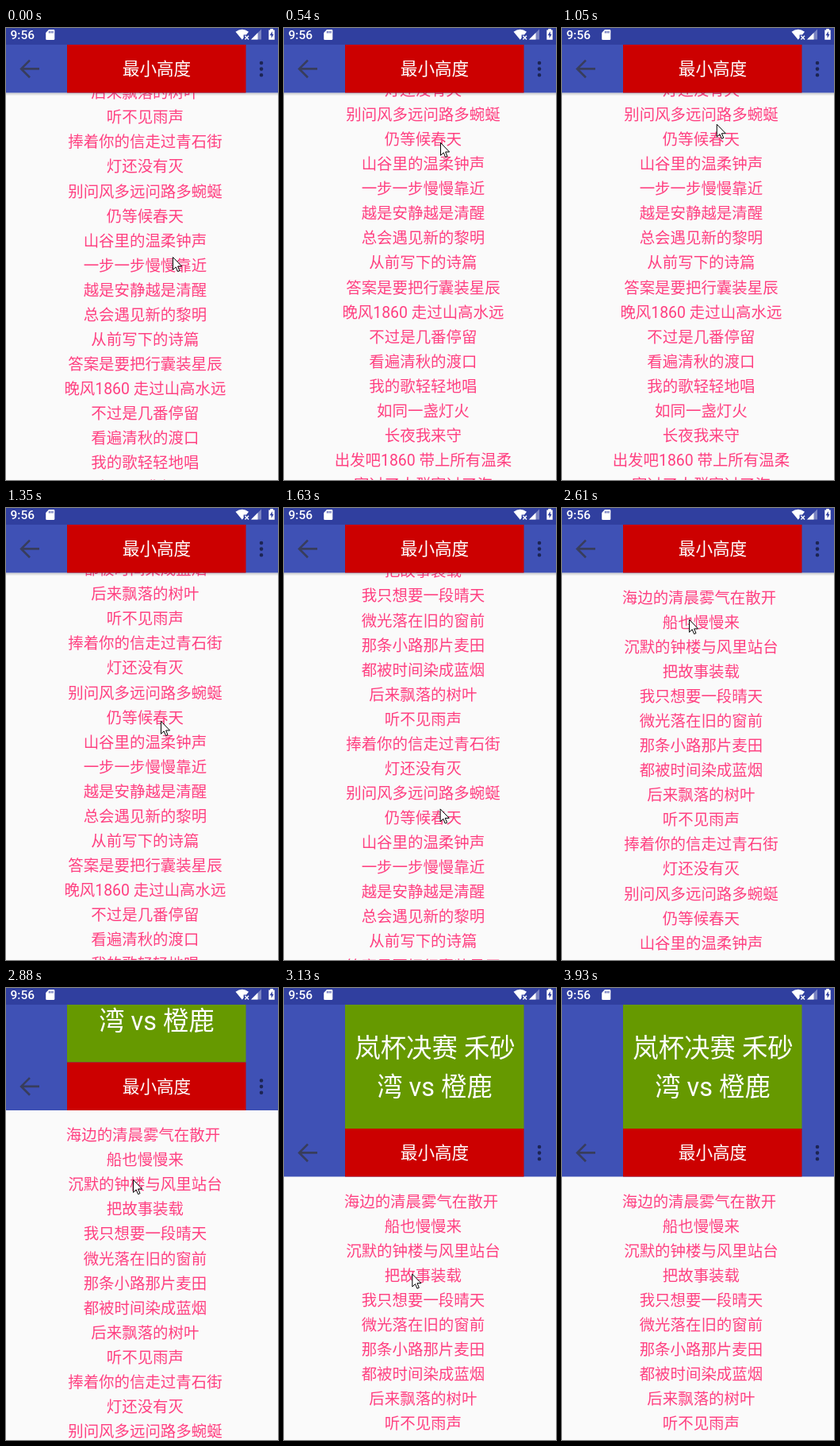
An HTML page for the animation above (5010 ms loop, 343x569 px).

```html
<!DOCTYPE html>
<html lang="zh-CN">
<head>
<meta charset="utf-8">
<title>最小高度</title>
<style>
  html, body { margin: 0; width: 100%; height: 100%; overflow: hidden; background: #fafafa; }
  svg { display: block; width: 100vw; height: 100vh; }
  text { font-family: Roboto, "Noto Sans CJK SC", "Noto Sans CJK", sans-serif; text-anchor: middle; }
  #lines { font-size: 19.45px; fill: #ff4081; }
  .title { font-size: 21.6px; fill: #fff; }
  .match { font-size: 32.4px; fill: #fff; }
  .clock { font-size: 15.5px; font-weight: 500; fill: #fff; text-anchor: start; }
</style>
</head>
<body>
<svg viewBox="0 0 343 569">
  <defs>
    <linearGradient id="fade" x2="0" y2="1">
      <stop stop-color="#000" stop-opacity=".2"/>
      <stop offset="1" stop-color="#000" stop-opacity="0"/>
    </linearGradient>
  </defs>
  <rect width="343" height="569" fill="#fafafa"/>
  <g id="lines"></g>

  <!-- app bar, drawn collapsed; the green part hides above -->
  <g id="bar">
    <rect id="shadow" y="81.5" width="343" height="4" fill="url(#fade)"/>
    <rect y="-135" width="343" height="216.5" fill="#3f51b5"/>
    <rect x="77" y="-135" width="225.5" height="156" fill="#690"/>
    <text class="match" x="190.5" y="-69">岚杯决赛 禾砂</text>
    <text class="match" x="190" y="-20">湾 vs 橙鹿</text>
    <rect x="77" y="21" width="225.5" height="60.5" fill="#c00"/>
    <text class="title" x="190" y="59">最小高度</text>
    <path d="M42 51.4H20M30 40.6L19.2 51.4L30 62.2" fill="none" stroke="#383d5c" stroke-width="2.7"/>
    <path d="M322 44V60" stroke="#1d2553" stroke-width="4.6" stroke-linecap="round" stroke-dasharray="0 7.6"/>
  </g>

  <!-- status bar -->
  <rect width="343" height="21" fill="#303f9f"/>
  <text class="clock" x="5.5" y="14">9:56</text>
  <path d="M54 2H60Q61.3 2 61.3 3.3V13.7Q61.3 15 60 15H51.5Q50.2 15 50.2 13.7V6Z" fill="#fff"/>
  <path d="M54.6 4V6.6M56.8 4V6.6M59 4V6.6" stroke="#303f9f" stroke-width="1.1"/>
  <path d="M289.5 4.8Q297.8 -1.4 306 4.8L303 8.6H299.6V12.6L297.8 14.8Z" fill="#fff"/>
  <path d="M301.4 9.8L306 14.4M306 9.8L301.4 14.4" stroke="#fff" stroke-width="1.4"/>
  <path d="M322 1.5V14.5H309Z" fill="#fff" fill-opacity=".35"/>
  <path d="M317.5 6V14.5H309Z" fill="#fff"/>
  <path d="M333.2 2.4V1H336.8V2.4H338.7V14.8H331.3V2.4Z" fill="#fff"/>
  <path d="M335.8 4L332.6 9.2H334.6V13L337.6 7.8H335.8Z" fill="#303f9f"/>

  <path id="cursor" d="M.5 .5V16.4L4.2 12.9L6.6 18.6L9 17.6L6.6 12H11.6Z" fill="#fff" stroke="#000"/>
</svg>
<script>
const LOOP = 5010, TICK = 135, PITCH = 31.07, FIRST = 119.7;

const verses = `海边的清晨雾气在散开
船也慢慢来
沉默的钟楼与风里站台
把故事装载
我只想要一段晴天
微光落在旧的窗前
那条小路那片麦田
都被时间染成蓝烟
后来飘落的树叶
听不见雨声
捧着你的信走过青石街
灯还没有灭
别问风多远问路多蜿蜒
仍等候春天
山谷里的温柔钟声
一步一步慢慢靠近
越是安静越是清醒
总会遇见新的黎明
从前写下的诗篇
答案是要把行囊装星辰
晚风1860 走过山高水远
不过是几番停留
看遍清秋的渡口
我的歌轻轻地唱
如同一盏灯火
长夜我来守
出发吧1860 带上所有温柔
穿过了人群穿过了海`.split("\n");

// Key points: [tick, value...], joined by straight runs
const scroll = [[0, -280], [2, -376.5], [8, -376.5], [10, -253], [14, 0]];
const open = [[13, 0], [14, 1], [15, 37], [16, 0], [19, 0], [21, 72.5], [23, 156]];
const pointer = [[0, 210, 288], [2, 203, 202], [4, 197, 144], [8, 194, 113], [10, 195, 268],
  [15, 199, 544], [16, 176, 278], [19, 160, 140], [21, 160, 241], [24, 162, 419],
  [26, 158, 468], [29, 90, 600]];

const el = id => document.getElementById(id);
const move = (id, x, y) => el(id).setAttribute("transform", `translate(${x} ${y})`);

function at(keys, tick) {
  const next = keys.findIndex(key => key[0] > tick);
  if (next < 1) return keys.at(next).slice(1);
  const [a, b] = [keys[next - 1], keys[next]];
  const part = (tick - a[0]) / (b[0] - a[0]);
  return a.map((v, i) => v + (b[i] - v) * part).slice(1);
}

verses.forEach((verse, i) => {
  const line = document.createElementNS("http://www.w3.org/2000/svg", "text");
  line.setAttribute("x", i ? 175.4 : 173);
  line.setAttribute("y", FIRST + i * PITCH);
  line.textContent = verse;
  el("lines").append(line);
});

function draw() {
  // The screen refreshes in steps, so motion is sampled once per tick
  const tick = Math.floor(performance.now() % LOOP / TICK);
  const [offset] = at(open, tick);
  move("lines", 0, at(scroll, tick)[0] + offset);
  move("bar", 0, offset);
  move("cursor", ...at(pointer, tick));
  el("shadow").setAttribute("opacity", offset > 1 ? 0 : 1);
  requestAnimationFrame(draw);
}
draw();
</script>
</body>
</html>
```
